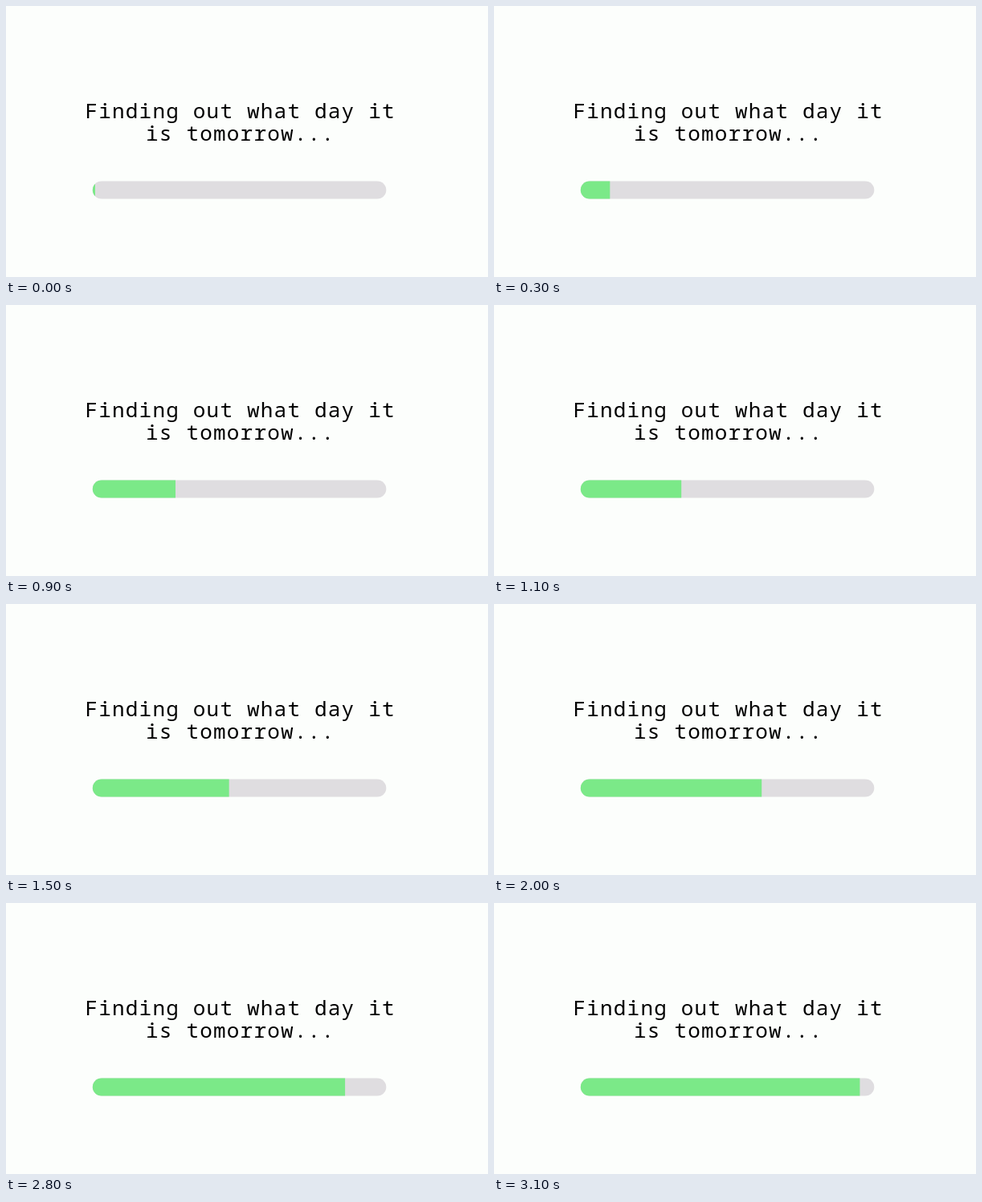
Animation, 600 px wide and 338 px high, one loop 3200 ms. Source, as an HTML page:

```html
<!DOCTYPE html>
<html lang="en">
<head>
<meta charset="utf-8">
<title>Progress</title>
<style>
  html, body { margin: 0; width: 100%; height: 100%; overflow: hidden; background: #fcfefc; }
  svg { display: block; width: 100%; height: 100%; }
  text {
    font: 26px "Noto Sans Mono", monospace;
    letter-spacing: 1.2px;
    text-anchor: middle;
    fill: #000;
  }
</style>
</head>
<body>
<svg viewBox="0 0 600 338">
  <clipPath id="pill"><rect x="107.8" y="218.5" width="365.5" height="22" rx="11"/></clipPath>
  <text x="291.6" y="140.3">Finding out what day it</text>
  <text x="291.6" y="168.3">is tomorrow...</text>
  <g clip-path="url(#pill)">
    <rect x="107" y="218" width="367" height="23" fill="#dfdde0"/>
    <rect id="fill" x="107" y="218" height="23" fill="#7be988"/>
  </g>
</svg>
<script>
  const LOOP = 3200, STEP = 100;
  const fill = document.getElementById('fill');

  function draw(now) {
    const step = Math.floor(now % LOOP / STEP);
    fill.setAttribute('width', 4 + step * 11.11);
    requestAnimationFrame(draw);
  }
  draw(performance.now());
</script>
</body>
</html>
```
